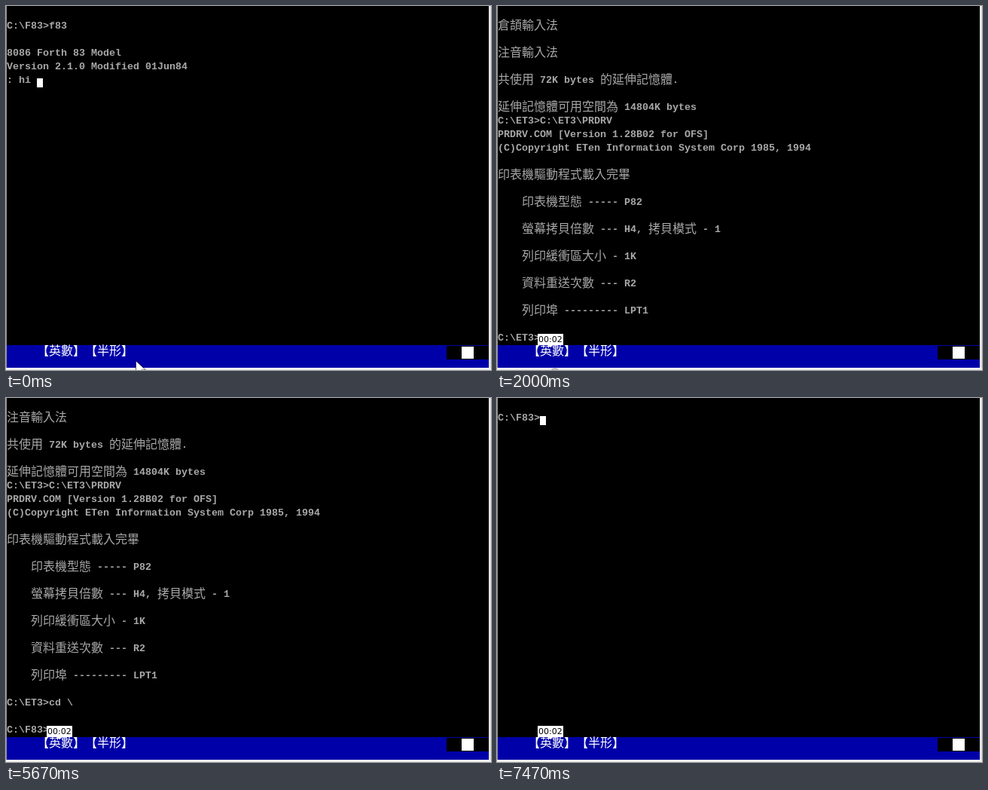
These frames come from a looping animation (644 by 483 pixels, 8 s). An HTML page:

```html
<!DOCTYPE html>
<html lang="zh-Hant">
<head>
<meta charset="utf-8">
<title>Forth session</title>
<style>
  html, body { margin: 0; width: 100%; height: 100%; overflow: hidden; background: #000; }
  svg { display: block; width: 644px; height: 483px; }
  text { white-space: pre; text-spacing-trim: space-all; font-kerning: none; }
  .latin { font: bold 13.333px "Liberation Mono", "Courier New", monospace; }
  .han { font: 300 16px "Noto Sans CJK TC", "Noto Sans CJK", "Noto Sans CJK JP", sans-serif; }
  #rows { fill: #a8a8a8; }
  #tip text { font: 11px "DejaVu Sans", Verdana, sans-serif; }
</style>
</head>
<body>
<svg viewBox="0 0 644 483">
  <rect width="644" height="483"/>
  <g id="rows"></g>
  <rect id="caret" width="8" height="12" fill="#fff"/>
  <rect x="1" y="450" width="640" height="30" fill="#0000a8"/>
  <text class="han" x="41" y="463" fill="#fff">【英數】【半形】</text>
  <rect x="585" y="451" width="56" height="18"/>
  <rect x="605" y="452" width="16" height="16" fill="#fff"/>
  <rect width="1" height="483" fill="#999"/>
  <rect x="641" width="3" height="483" fill="#e3e3e3"/>
  <rect y="480" width="644" height="3" fill="#f0f0f0"/>
  <circle id="knob" cy="487" r="6" fill="#ddd" stroke="#888"/>
  <g id="tip">
    <rect x="-17" y="435" width="34" height="15" fill="#fff"/>
    <path d="M-4 450h8l-4 3z" fill="#fff"/>
    <text x="-16" y="446"></text>
  </g>
  <path id="mouse" d="M0 0v17l4-4 3 6 3-1-3-6h6z" fill="#fff" stroke="#000" stroke-width=".6"/>
</svg>
<script>
const LOOP = 8000, ROWS = 24;
const $ = id => document.getElementById(id);
const rows = $('rows'), caret = $('caret'), knob = $('knob'), tip = $('tip'), mouse = $('mouse');
const tipText = tip.querySelector('text');

const log = String.raw`倉頡輸入法

注音輸入法

共使用 72K bytes 的延伸記憶體.

延伸記憶體可用空間為 14804K bytes
C:\ET3>C:\ET3\PRDRV
PRDRV.COM [Version 1.28B02 for OFS]
(C)Copyright ETen Information System Corp 1985, 1994

印表機驅動程式載入完畢

    印表機型態 ----- P82

    螢幕拷貝倍數 --- H4, 拷貝模式 - 1

    列印緩衝區大小 - 1K

    資料重送次數 --- R2

    列印埠 --------- LPT1

C:\ET3>cd \

C:\>cd f83
`.split('\n');

const pad = lines => Array.from({ length: ROWS }, (_, i) => lines[i] || '');
const page = (from, last) => [...pad(log.slice(from)).slice(0, ROWS - 1), last];
// A half-finished repaint: the top is new, the rest is still old.
const tear = (before, after) => [...after.slice(0, 12), ...before.slice(12)];

const intro = pad(['C:\\F83>f83', '', '8086 Forth 83 Model',
  'Version 2.1.0 Modified 01Jun84', ': hi ']);
const blank = pad([]);
const et3 = page(0, 'C:\\>T3>'), root = page(2, 'C:\\>');
const f83Old = page(2, 'C:\\F83>'), f83 = page(4, 'C:\\F83>');

// time, lines, caret column and row
const steps = [
  [0, intro, 5, 4],
  [1000, page(0, 'C:\\ET3>')],
  [3070, page(0, 'C:\\ET3>c')],
  [3130, page(0, 'C:\\ET3>cd')],
  [3270, page(0, 'C:\\ET3>cd \\')],
  [3470, et3],
  [3530, tear(et3, root)],
  [3600, root, 4, 23],
  [4000, page(2, 'C:\\>c'), 5, 23],
  [4130, page(2, 'C:\\>cd ')],
  [5670, f83Old],
  [5870, tear(f83Old, f83)],
  [5930, f83],
  [7270, tear(f83, blank)],
  [7400, blank],
  [7470, pad(['C:\\F83>']), 7, 0]
];

const tipTimes = [270, 330, 400, 470, 530, 600, 670, 730];
const knobSteps = [
  [270, 201], [870, 68], [1200, 69.5], [1470, 72], [1730, 74.5],
  [2000, 77], [2270, 79.5], [2470, 82], [2800, 84.5]
];

const current = (table, t) => table.filter(s => s[0] <= t).pop();
const show = (el, on) => el.setAttribute('visibility', on ? 'visible' : 'hidden');
const isHan = c => c >= '\u3000';

function addText(str, col, row, han) {
  const el = document.createElementNS('http://www.w3.org/2000/svg', 'text');
  el.setAttribute('class', han ? 'han' : 'latin');
  el.setAttribute('x', 1 + col * 8);
  el.setAttribute('y', (han ? 31 : 30) + row * 18);
  el.textContent = str;
  rows.append(el);
}

function drawLine(line, row) {
  let col = 0;
  for (const run of line.match(/[\u3000-\u9fff]+| +|[!-~]+(?: +[!-~]+)*/g) || []) {
    const han = isHan(run[0]);
    if (run.trim()) addText(run, col, row, han);
    col += run.length * (han ? 2 : 1);
  }
}

let shown;
function drawScreen(t) {
  const step = current(steps, t);
  if (step === shown) return;
  shown = step;
  const [, lines, col, row] = step;
  rows.textContent = '';
  lines.forEach(drawLine);
  show(caret, col !== undefined);
  if (col !== undefined) {
    caret.setAttribute('x', 1 + col * 8);
    caret.setAttribute('y', 24 + row * 18);
  }
}

function tipX(t) {
  if (t >= 1000) return 71;
  const n = tipTimes.filter(s => s <= t).length;
  const left = 1 - (n - 1) / (tipTimes.length - 1);
  return Math.round(65.5 + 75 * left * left);
}

function drawPlayer(t) {
  show(mouse, t < 130);
  mouse.setAttribute('transform', t < 70 ? 'translate(172.5 471)' : 'translate(145 476)');

  show(tip, t >= 270);
  const x = tipX(t);
  tip.setAttribute('transform', `translate(${x} 0)`);
  const sec = Math.floor((x - 51) / 9.6);
  tipText.textContent = '00:' + String(sec).padStart(2, '0');

  const k = current(knobSteps, t);
  show(knob, k && t < 3400);
  if (k) knob.setAttribute('cx', k[1]);
  knob.setAttribute('opacity', Math.min(1, Math.max(0, (3400 - t) / 400)));
}

const start = performance.now();
function frame() {
  const t = (performance.now() - start) % LOOP;
  drawScreen(t);
  drawPlayer(t);
  requestAnimationFrame(frame);
}
frame();
</script>
</body>
</html>
```
